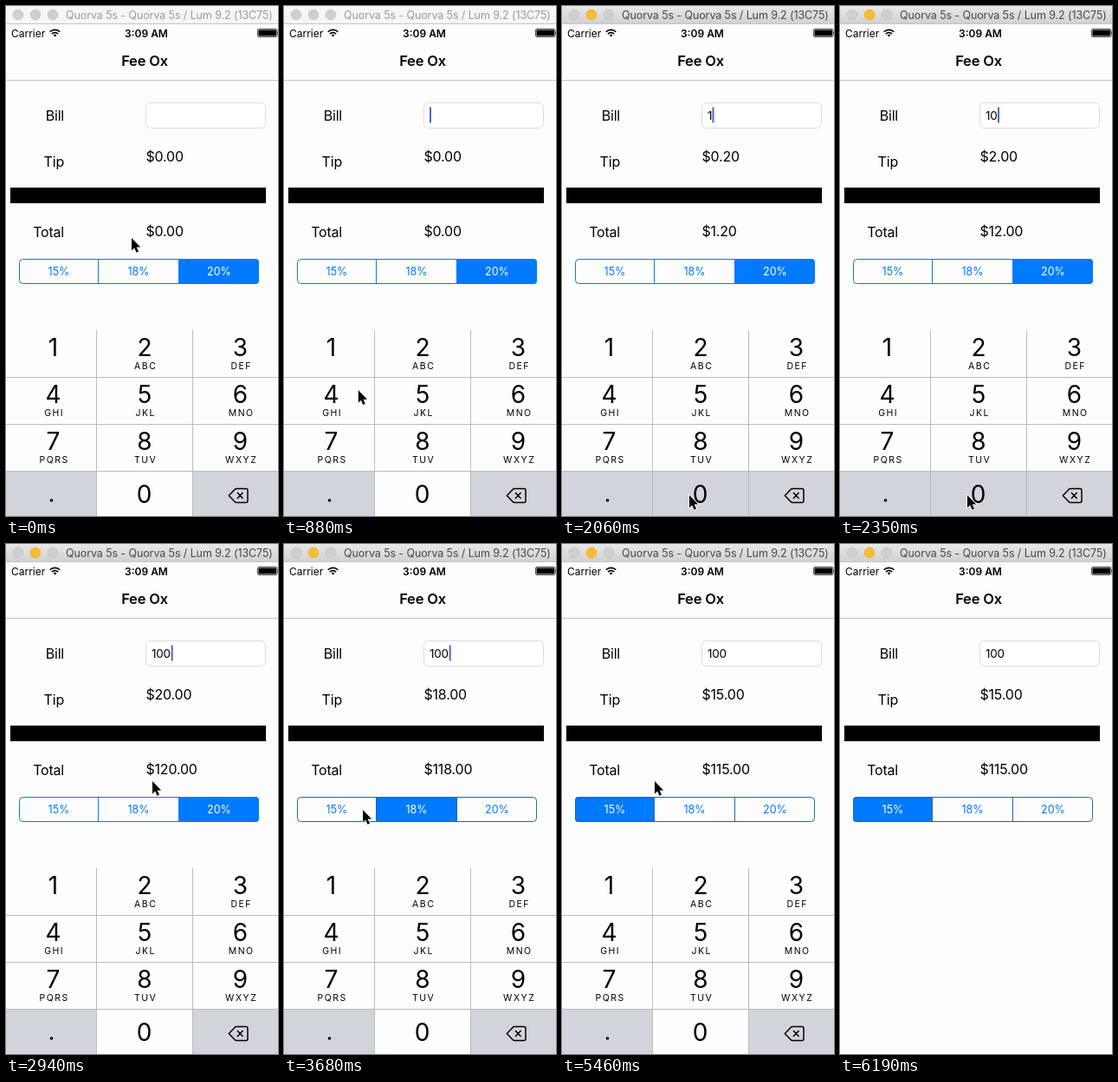
An HTML page that plays this animation: 314 px wide and 587 px high, repeating every 6.64 s.

```html
<!DOCTYPE html>
<html lang="en">
<head>
<meta charset="utf-8">
<title>Tip calculator</title>
<style>
  html, body { margin: 0; height: 100%; overflow: hidden; background: #fdfdfd; }
  svg { display: block; width: 100vw; height: 100vh; }
  text { font: 16px Inter, "Open Sans", sans-serif; letter-spacing: -.2px; }
  .mid { text-anchor: middle; }
  .end { text-anchor: end; }
  #caption { font-size: 12.5px; letter-spacing: -.1px; }
  .status { font-size: 12px; letter-spacing: 0; }
  .bold { font-weight: 600; }
  .heading { font-size: 16.5px; }
  #bill { font-size: 13.5px; }
  .segment text { font-size: 12.5px; letter-spacing: 0; }
  .digit { font-size: 28px; letter-spacing: 0; }
  .letters { font-size: 10.5px; letter-spacing: 1.5px; }
</style>
</head>
<body>
<svg viewBox="0 0 314 587">
  <defs>
    <linearGradient id="chrome" x2="0" y2="1">
      <stop stop-color="#e9e8e9"/><stop offset="1" stop-color="#d2d1d2"/>
    </linearGradient>
    <clipPath id="pill"><rect x="15" y="291" width="277" height="29" rx="4"/></clipPath>
  </defs>
  <rect width="314" height="587" fill="#fdfdfd"/>

  <rect id="titlebar" width="314" height="20"/>
  <path d="M0 20.5H314" stroke="#c4c4c4"/>
  <g stroke-width=".7">
    <circle class="light" cx="14" cy="10" r="5.8"/>
    <circle class="light" cx="34" cy="10" r="5.8"/>
    <circle class="light" cx="54" cy="10" r="5.8"/>
  </g>
  <text id="caption" x="69" y="15">Quorva 5s - Quorva 5s / Lum 9.2 (13C75)</text>

  <text class="status" x="6" y="35.5">Carrier</text>
  <g fill="none" stroke="#000" stroke-width="1.6">
    <path d="M50.7 29.8a8.2 8.2 0 0 1 11.6 0M52.9 32.1a5.1 5.1 0 0 1 7.2 0"/>
    <path d="M54.6 33.6a2.8 2.8 0 0 1 3.8 0L56.5 35.6z" fill="#000" stroke="none"/>
  </g>
  <text class="status bold mid" x="162" y="35.5">3:09 AM</text>
  <rect x="290.5" y="26.5" width="22.5" height="9" rx="1.5" fill="none" stroke="#000" stroke-width=".7"/>
  <rect x="291.5" y="27.5" width="20.5" height="7"/>
  <rect x="313.4" y="29.5" width="1" height="3"/>

  <text class="bold heading mid" x="160" y="69">Fee Ox</text>
  <path d="M0 85.5H314" stroke="#c3c3c5"/>

  <text class="end" x="67" y="131.5">Bill</text>
  <text class="end" x="67" y="184.5">Tip</text>
  <text class="end" x="67" y="265.5">Total</text>
  <rect x="161.5" y="111.5" width="138" height="29" rx="5" fill="#fff" stroke="#dcdcdc"/>
  <text id="bill" x="168" y="131"></text>
  <rect id="caret" y="116.5" width="2" height="18" fill="#4a66dc"/>
  <text id="tip" x="161.5" y="178.5"></text>
  <rect x="5" y="209" width="295" height="18"/>
  <text id="total" x="161.5" y="264.5"></text>

  <g id="segments" clip-path="url(#pill)"></g>
  <path id="outline" fill="none"
    d="M19.5 291.5H287.5a4 4 0 0 1 4 4V315.5a4 4 0 0 1-4 4H19.5a4 4 0 0 1-4-4V295.5a4 4 0 0 1 4-4zM106.5 291V320M199.5 291V320"/>

  <g id="keyboard">
    <rect y="373" width="314" height="214" fill="#fdfdfd"/>
    <path d="M0 535H105V587H0zM215 535H314V587H215z" fill="#d1d4da"/>
    <rect id="zero" x="105" y="535" width="110" height="52" fill="#d1d4da"/>
    <path d="M0 427.5H314M0 481.5H314M0 535.5H314M104.5 373V587M215.5 373V587" stroke="#b9bbbf"/>
    <g id="keys"></g>
    <circle cx="52.5" cy="569" r="1.8"/>
    <path d="M257.3 563.5L264.3 556.2Q265 555.5 266 555.5H277q2 0 2 2V569.5q0 2-2 2H266q-1 0-1.7-.7zM267 560l6.6 7M273.6 560l-6.6 7"
      fill="none" stroke="#000" stroke-width="1.5" stroke-linejoin="round"/>
  </g>

  <path id="pointer" d="M0 0V14.4L3.2 11.5 5.5 16.8 8 15.7 5.7 10.5H10.2Z" stroke="#fff" stroke-width="1.6" paint-order="stroke"/>
</svg>
<script>
const LOOP = 6640, FIRST = 284, BEAT = 147.5;
const $ = id => document.getElementById(id);
const set = (el, attrs) => { for (const name in attrs) el.setAttribute(name, attrs[name]); };

const rates = [15, 18, 20];
const edges = [15, 106, 199, 292];
const centres = [61, 153, 246];
$('segments').innerHTML = rates.map((rate, i) => `<g class="segment">
  <rect x="${edges[i]}" y="291" width="${edges[i + 1] - edges[i] + 1}" height="29"/>
  <text class="mid" x="${centres[i]}" y="310">${rate}%</text></g>`).join('');
const segments = [...document.querySelectorAll('.segment')];
const lights = [...document.querySelectorAll('.light')];

const columns = [54.5, 160, 270.5];
const letters = ['', 'ABC', 'DEF', 'GHI', 'JKL', 'MNO', 'PQRS', 'TUV', 'WXYZ'];
$('keys').innerHTML = letters.map((label, i) => {
  const x = columns[i % 3], y = 403 + 54 * Math.floor(i / 3);
  return `<text class="digit mid" x="${x}" y="${y}">${i + 1}</text>
    <text class="letters mid" x="${x + 1.2}" y="${y + 15}">${label}</text>`;
}).join('') + '<text class="digit mid" x="159.5" y="572">0</text>';

// Pointer stops: beat, x, y
const route = [
  [-1, 145, 267], [3, 92, 457], [6, 68, 400], [9, 68, 400], [12, 147, 563],
  [15, 147, 563], [18, 169, 273], [20, 152, 303], [21, 150, 304], [23, 91, 306],
  [25, 72, 304], [27, 72, 304], [30, 102, 293], [34, 102, 293], [36, 112, 253],
  [37, 114, 256], [40, 330, 600]
];
const ease = p => p * p * (3 - 2 * p);

function pointerAt(beat) {
  const i = Math.max(1, route.findIndex(stop => stop[0] >= beat));
  const [b0, x0, y0] = route[i - 1], [b1, x1, y1] = route[i];
  const p = ease((beat - b0) / (b1 - b0));
  return [x0 + (x1 - x0) * p, y0 + (y1 - y0) * p];
}

function caretOpacity(beat) {
  if (beat > 32) return 0;
  if (beat >= 8 && beat <= 18) return 1;
  const phase = (beat + .8) % 6.75;
  return phase < 1.7 ? 0 : phase > 6 ? .4 : 1;
}

function draw(time) {
  const beat = Math.min(40, Math.max(-1, Math.floor((time - FIRST) / BEAT)));
  const active = beat >= 8;
  const bill = beat < 8 ? '' : beat < 13 ? '1' : beat < 15 ? '10' : '100';
  const chosen = beat < 21 ? 2 : beat < 25 ? 1 : 0;
  const tip = bill * rates[chosen] / 100;

  set($('titlebar'), { fill: active ? 'url(#chrome)' : '#f6f6f6' });
  set($('caption'), { fill: active ? '#484848' : '#9b9b9b' });
  lights.forEach((light, i) => {
    const lit = active && i === 1;
    set(light, { fill: lit ? '#fdbd2e' : '#d0cfd0', stroke: lit ? '#dfa023' : '#bdbcbd' });
  });

  $('bill').textContent = bill;
  $('tip').textContent = '$' + tip.toFixed(2);
  $('total').textContent = '$' + (+bill + tip).toFixed(2);
  set($('caret'), { x: [168, 173.5, 182, 190.7][bill.length], opacity: caretOpacity(beat) });

  segments.forEach((segment, i) => {
    const on = i === chosen;
    set(segment.children[0], { fill: on ? '#007aff' : '#fdfdfd' });
    set(segment.children[1], { fill: on ? '#fff' : '#007aff' });
  });
  set($('outline'), { stroke: chosen === 2 ? '#007aff' : '#1f66b3' });

  set($('zero'), { opacity: beat === 12 || beat === 14 ? 1 : 0 });
  const slide = ease(Math.min(1, Math.max(0, (beat - 36) / 3)));
  set($('keyboard'), { transform: `translate(0 ${slide * 215})` });
  set($('pointer'), { transform: `translate(${pointerAt(beat)})` });
}

function tick() {
  draw(performance.now() % LOOP);
  requestAnimationFrame(tick);
}
tick();
</script>
</body>
</html>
```
